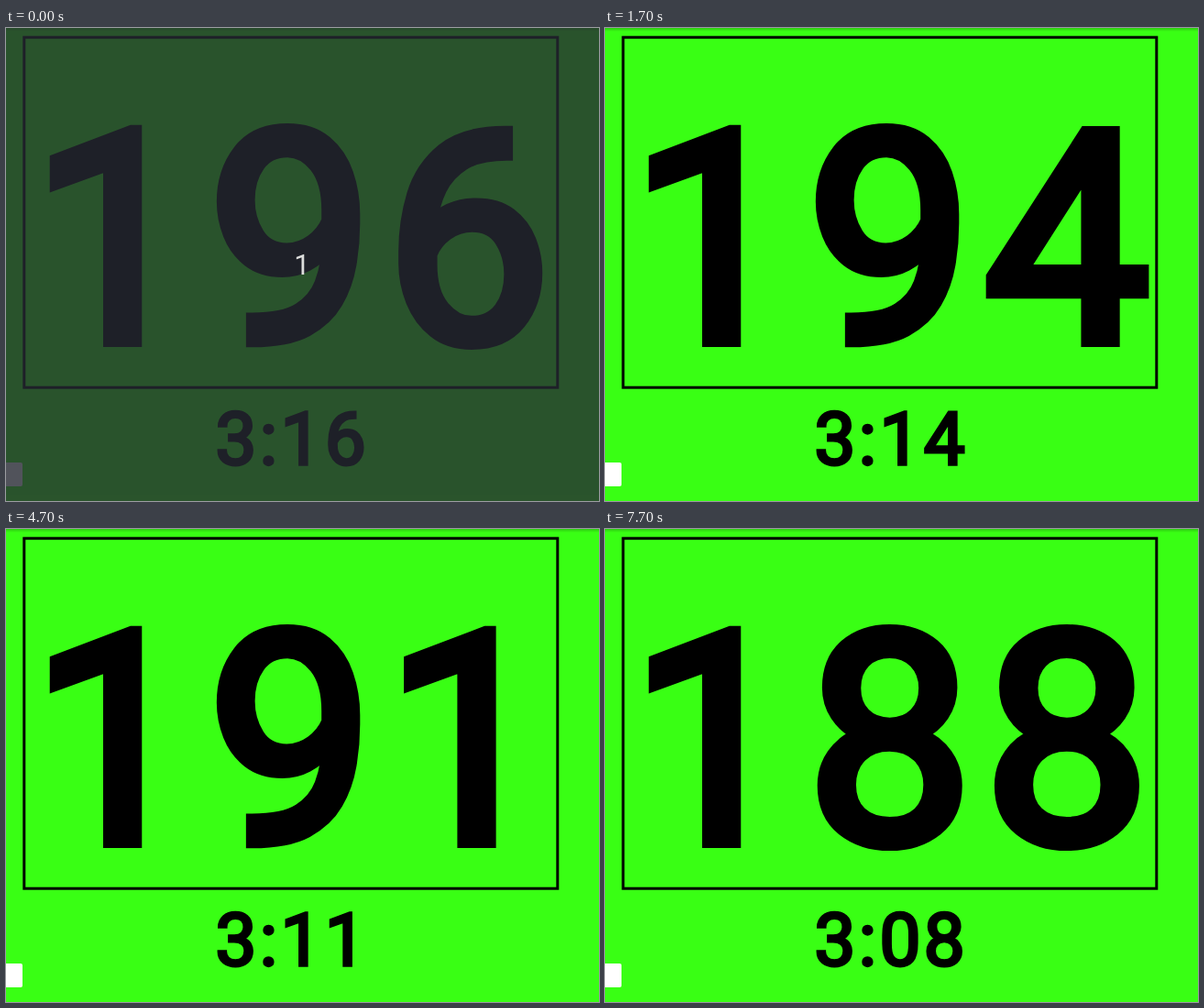
Recreate the animation shown at these times as an HTML page. Size 647 by 516 pixels, loop 8000 ms.

```html
<!DOCTYPE html>
<html lang="en">
<head>
<meta charset="utf-8">
<title>Countdown</title>
<style>
  html, body { margin: 0; width: 100%; height: 100%; overflow: hidden; background: #39ff14; }
  svg { display: block; width: 647px; height: 516px; font-family: Roboto, sans-serif; font-weight: 400; text-rendering: geometricPrecision; }
  /* Regular weight emboldened by 1/24 em in outline and advance */
  .bold { stroke: #000; stroke-width: .0417em; letter-spacing: .0417em; }
</style>
</head>
<body>
<svg viewBox="0 0 647 516">
  <defs>
    <linearGradient id="shade" x2="0" y2="1">
      <stop stop-opacity=".2"/>
      <stop offset="1" stop-opacity="0"/>
    </linearGradient>
  </defs>
  <rect width="647" height="516" fill="#39ff14"/>
  <rect width="647" height="4" fill="url(#shade)"/>
  <rect x="19.8" y="10.2" width="582" height="382" fill="none" stroke="#000" stroke-width="3"/>
  <text id="total" class="bold" x="27.7" y="341.3" font-size="320"></text>
  <text id="clock" class="bold" x="228.5" y="476.3" font-size="80"></text>
  <rect x="-10" y="474" width="28" height="26" rx="2" fill="#fff"/>
  <g id="intro">
    <rect width="647" height="516" fill="#262932" fill-opacity=".8"/>
    <text x="323" y="269" font-size="31" text-anchor="middle" fill="#dcdddc">1</text>
  </g>
</svg>
<script>
  const LOOP = 8000, INTRO_END = 500, FIRST_TICK = 700, START = 196;
  const [total, clock, intro] = ['total', 'clock', 'intro'].map(id => document.getElementById(id));
  let shown;

  function render(t) {
    const left = START - Math.max(0, Math.floor((t - FIRST_TICK) / 1000) + 1);
    intro.style.display = t < INTRO_END ? '' : 'none';
    if (left === shown) return;
    shown = left;
    total.textContent = left;
    clock.textContent = Math.floor(left / 60) + ':' + String(left % 60).padStart(2, '0');
  }

  const begin = performance.now();
  function tick() {
    render((performance.now() - begin) % LOOP);
    requestAnimationFrame(tick);
  }
  tick();
</script>
</body>
</html>
```
